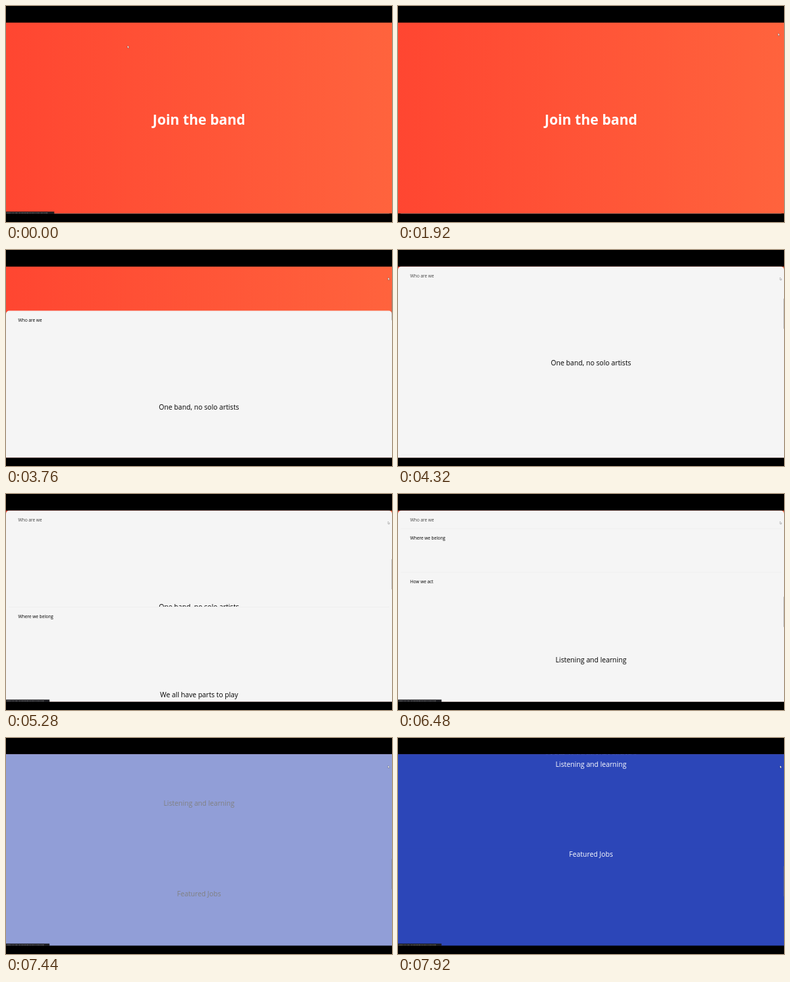
Write an HTML page with a canvas that moves like this. It is 572x322 px and loops after 8 s.

```html
<!DOCTYPE html>
<html lang="en">
<head>
<meta charset="utf-8">
<title>Join the band</title>
<style>
  html, body { margin: 0; width: 100%; height: 100%; overflow: hidden; background: #000; }
  canvas { display: block; width: 572px; height: 322px; }
</style>
</head>
<body>
<canvas id="stage"></canvas>
<script>
const W = 572, H = 322, LOOP = 8000, STEP = 80;
const TOP = 24.5, BOTTOM = 309.5, VIEW = BOTTOM - TOP;
const HEADER = 27, SHORT_SHEET = VIEW - HEADER;
const FAMILY = '"Open Sans", "Noto Sans", sans-serif';

const canvas = document.getElementById('stage');
const ctx = canvas.getContext('2d');
const ratio = window.devicePixelRatio || 1;
canvas.width = W * ratio;
canvas.height = H * ratio;
ctx.scale(ratio, ratio);

// Wheel gestures: start, end, scroll position reached, bias of the easing
const SCROLLS = [
  [2400, 3200, 155.5, 1.9],
  [3280, 4160, 277.5, 1.1],
  [4160, 5040, 420, 1],
  [5200, 6080, 694.5, 1],
  [6160, 6800, 758, 0.725],
  [6960, 7840, 945, 0.77],
];

// Pointer path: time, x, y
const POINTER = [
  [960, 510, 35], [1120, 533, 36], [1200, 533, 36], [1520, 559, 40],
  [1680, 559, 40], [2080, 566, 41],
];

const progress = (t, from, to) => Math.min(1, Math.max(0, (t - from) / (to - from)));
const smooth = x => x * x * (3 - 2 * x);
const mix = (a, b, k) => a + (b - a) * k;
const mixColor = (a, b, k) => `rgb(${a.map((v, i) => Math.round(mix(v, b[i], k)))})`;

function scrollAt(t) {
  let position = 0;
  for (const [from, to, target, bias] of SCROLLS) {
    position = mix(position, target, smooth(progress(t, from, to) ** bias));
  }
  return position;
}

function text(str, x, y, size, color, align = 'center', weight = 400) {
  ctx.font = `${weight} ${size}px ${FAMILY}`;
  ctx.textAlign = align;
  ctx.fillStyle = color;
  ctx.fillText(str, x, y);
}

function hero(y) {
  const gradient = ctx.createLinearGradient(0, 0, W, 0);
  gradient.addColorStop(0, '#ff4631');
  gradient.addColorStop(1, '#ff633d');
  ctx.fillStyle = gradient;
  ctx.fillRect(0, y, W, VIEW);
  text('Join the band', W / 2, y + 152.5, 20.7, '#fff', 'center', 700);
}

function sheet(y, height, title, line, lineY, paper, ink, titleInk = ink) {
  if (y > BOTTOM) return;
  ctx.beginPath();
  ctx.roundRect(0, y, W, height, [5, 5, 0, 0]);
  ctx.fillStyle = paper;
  ctx.fill();
  ctx.fillStyle = 'rgba(0,0,0,.03)';
  ctx.fillRect(4, y, W - 8, 0.8);
  text(title, 18, y + 16.4, 6.45, titleInk, 'left');
  text(line, W / 2, y + lineY, 10.2, ink);
}

function page(t) {
  const scroll = scrollAt(t);
  const tint = smooth(progress(t, 7180, 7700));
  const paper = mixColor([245, 245, 245], [44, 70, 184], tint);
  const ink = mixColor([0, 0, 0], [255, 255, 255], tint);

  // The pinned stack leaves together once the last sheet reaches it
  const firstY = TOP + VIEW - scroll;
  const secondY = firstY + VIEW;
  const thirdY = secondY + SHORT_SHEET;
  const release = Math.min(0, thirdY - TOP - HEADER);
  const pin = (y, offset) => Math.max(y, TOP + offset + release);

  hero(TOP + release);
  sheet(pin(firstY, 0), VIEW, 'Who are we', 'One band, no solo artists', 147.5,
        paper, ink, firstY < TOP && tint === 0 ? '#444' : ink);
  sheet(pin(secondY, HEADER), SHORT_SHEET, 'Where we belong', 'We all have parts to play', 135, paper, ink);
  sheet(thirdY, SHORT_SHEET, 'How we act', 'Listening and learning', 135, paper, ink);

  const jobsY = thirdY + SHORT_SHEET;
  ctx.fillStyle = paper;
  ctx.fillRect(0, jobsY - 1, W, VIEW + 1);
  text('Featured Jobs', W / 2, thirdY + 269.5, 10.2, ink);

  if (scroll > 0) {
    ctx.fillStyle = 'rgba(120,120,120,.4)';
    ctx.fillRect(571, 20 + scroll * 0.181, 1, 45);
  }
}

function pointer(t) {
  let x = 180, y = 59;
  if (t >= 480 && t < 960) return;
  if (t >= 960) {
    [, x, y] = POINTER[0];
    for (let i = 1; i < POINTER.length; i++) {
      const k = progress(t, POINTER[i - 1][0], POINTER[i][0]);
      x = mix(x, POINTER[i][1], k);
      y = mix(y, POINTER[i][2], k);
    }
  }
  ctx.beginPath();
  ctx.moveTo(x, y);
  for (const [dx, dy] of [[0, 3.7], [0.9, 2.9], [1.5, 4.2], [2.1, 3.9], [1.5, 2.7], [2.7, 2.6]]) {
    ctx.lineTo(x + dx, y + dy);
  }
  ctx.closePath();
  ctx.fillStyle = '#fff';
  ctx.fill();
  ctx.lineWidth = 0.35;
  ctx.strokeStyle = 'rgba(0,0,0,.6)';
  ctx.stroke();
}

function hint(t) {
  const early = t < 640;
  if (!early && t < 4560) return;
  ctx.globalAlpha = early ? 1 - progress(t, 240, 640) : 1;
  ctx.fillStyle = '#1c1c20';
  ctx.fillRect(0, 306.5, early ? 71.5 : 64.5, 3.5);
  text(early ? 'PRESS ANY KEY TO SEE MORE OPTIONS FOR THIS PAGE' : 'PRESS ANY KEY TO SEE MORE OPTIONS FOR PAGE',
       1, 309.2, 2.4, t >= 7600 ? '#dcd9a0' : '#ddd', 'left');
  ctx.globalAlpha = 1;
}

function frame(now) {
  const t = Math.floor((now % LOOP) / STEP) * STEP;
  ctx.fillStyle = '#000';
  ctx.fillRect(0, 0, W, H);
  ctx.save();
  ctx.beginPath();
  ctx.rect(0, TOP, W, VIEW);
  ctx.clip();
  page(t);
  pointer(t);
  ctx.restore();
  hint(t);
}

const start = performance.now();
(function tick() {
  frame(performance.now() - start);
  requestAnimationFrame(tick);
})();
</script>
</body>
</html>
```
